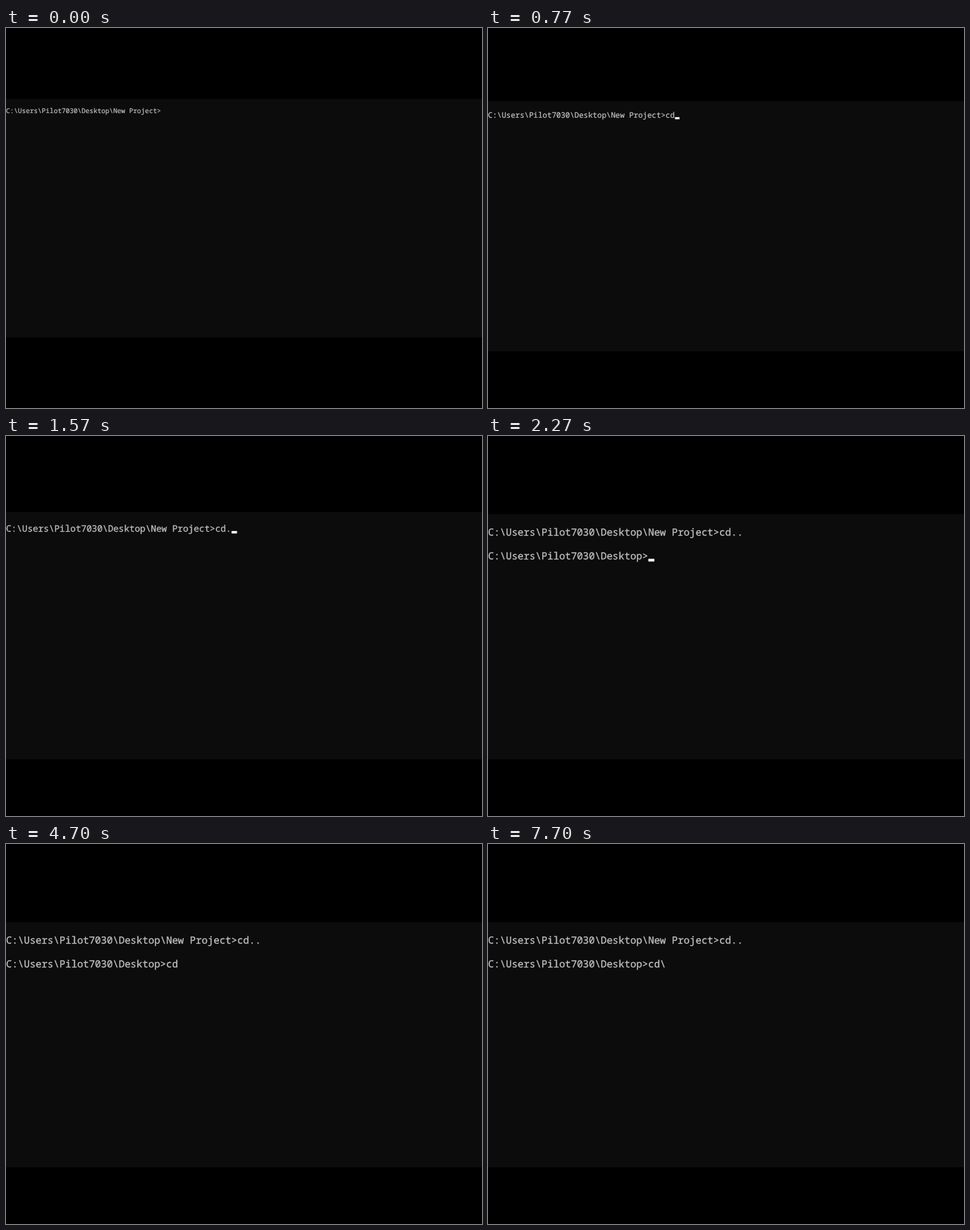
An HTML page that plays this animation: 720 by 576 pixels, repeating every 8 s.

```html
<!DOCTYPE html>
<html lang="en">
<head>
<meta charset="utf-8">
<title>Command prompt</title>
<style>
  html, body { margin: 0; width: 100%; height: 100%; overflow: hidden; background: #000; }
  svg { display: block; }
  text {
    font: 10.03px "Noto Sans Mono", "DejaVu Sans Mono", monospace;
    fill: #c2c2c2;
    stroke: #c2c2c2;
    stroke-width: .2px;
    text-rendering: geometricPrecision;
  }
</style>
</head>
<body>
<svg width="720" height="576">
  <svg y="85.5" width="720" height="404.5">
    <g id="view">
      <rect y="22" width="720" height="361.4" fill="#0c0c0c"/>
      <text id="line0" y="43.9"></text>
      <text id="line1" y="68"></text>
      <rect id="cursor" width="6.1" height="2.8" fill="#f2f2f2"/>
    </g>
  </svg>
</svg>
<script>
const LOOP = 8000, ZOOM_TIME = 2000, CELL = 6.018, LINE = 24.1;
const HOME = 'C:\\Users\\Pilot7030\\Desktop';
const prompts = [HOME + '\\New Project>', HOME + '>'];
const FIRST_COMMAND = 'cd..';

// [start ms, row, typed text, cursor opacity]
const steps = [
  [0, 0, '', 0],
  [330, 0, 'c', 0],
  [500, 0, 'c', 1],
  [560, 0, 'cd', 1],
  [900, 0, 'cd', 0],
  [1300, 0, 'cd', 1],
  [1420, 0, 'cd.', 1],
  [1630, 0, 'cd..', 1],
  [1740, 0, 'cd..', 0],
  [2130, 0, 'cd..', 1],
  [2200, 1, '', 1],
  [2930, 1, '', 0],
  [3330, 1, '', .5],
  [3365, 1, '', 1],
  [4100, 1, 'c', 1],
  [4330, 1, 'c', 0],
  [4565, 1, 'cd', 1],
  [4695, 1, 'cd', 0],
  [5100, 1, 'cd ', .5],
  [5130, 1, 'cd ', 1],
  [5400, 1, 'cd \\', 1],
  [6070, 1, 'cd ', 1],
  [6430, 1, 'cd', 1],
  [6865, 1, 'cd', 0],
  [7100, 1, 'cd\\', 1],
  [7630, 1, 'cd\\', .5],
  [7695, 1, 'cd\\', 0]
];

const [view, line0, line1, cursor] =
  ['view', 'line0', 'line1', 'cursor'].map(id => document.getElementById(id));

function draw(t) {
  // The visible area shrinks evenly, so the scale is its inverse.
  const scale = 1 / (1 - .33 * Math.min(t / ZOOM_TIME, 1));
  view.setAttribute('transform', `scale(${scale})`);

  const [, row, typed, opacity] = steps.findLast(step => step[0] <= t);
  line0.textContent = prompts[0] + (row ? FIRST_COMMAND : typed);
  line1.textContent = row ? prompts[1] + typed : '';
  cursor.setAttribute('x', (prompts[row] + typed).length * CELL);
  cursor.setAttribute('y', 43.3 + row * LINE);
  cursor.setAttribute('opacity', opacity);
}

const start = performance.now();
function frame() {
  draw((performance.now() - start) % LOOP);
  requestAnimationFrame(frame);
}
frame();
</script>
</body>
</html>
```
